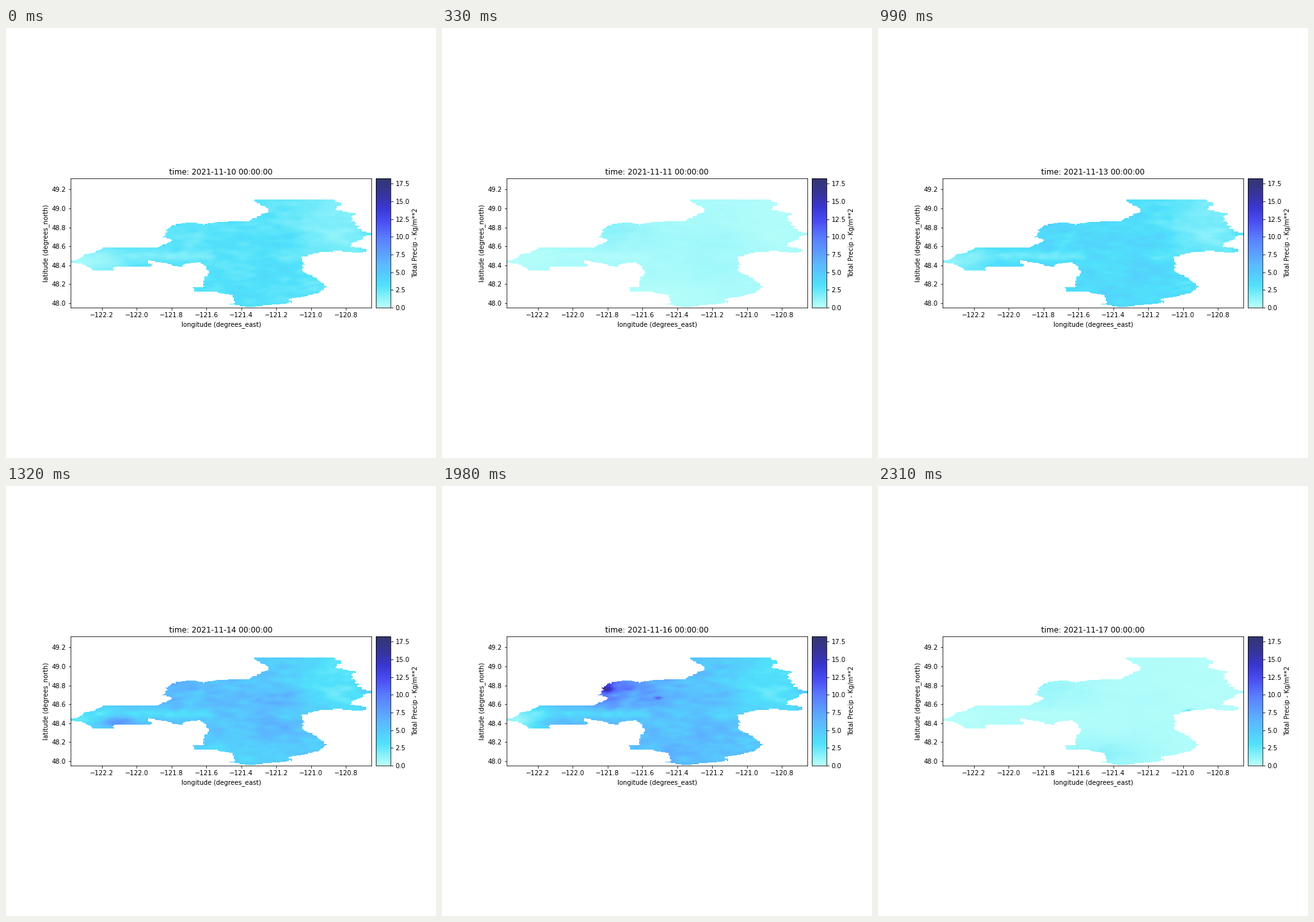
A matplotlib script that plays this animation: 672 by 672 pixels, repeating every 2.64 s.

```python
import numpy as np
import matplotlib.pyplot as plt
from matplotlib.animation import FuncAnimation
from matplotlib.colors import LinearSegmentedColormap
from matplotlib.path import Path

SIZE, DPI = 672, 72
MAP_BOX = (0.15, 0.35, 0.70, 0.30)
BAR_BOX = (0.86, 0.35, 0.035, 0.30)
EXTENT = (-122.380, -120.653, 47.9545, 49.3155)
NX, NY = 207, 164
VMAX = 18.24

# Key points of the basin outline in stage pixels, clockwise from the west
OUTLINE = [
    (98, 363.6), (112, 362.5), (124, 354.5), (137, 352), (152, 344),
    (236, 343.5), (262, 332), (246, 327), (252, 313), (268, 307), (290, 304),
    (309, 308), (333, 303), (376, 302), (391, 296), (411, 286), (388, 271),
    (388, 269), (510, 269), (525, 276), (513, 284), (544, 291), (541, 301),
    (551, 314), (563, 320.6), (578, 320.6), (578, 323.4), (564, 324),
    (553, 332), (537, 337), (541, 343), (564, 345), (558, 352), (520, 349),
    (495, 350), (460, 359), (466, 368), (460, 380), (481, 389), (502, 405),
    (483, 416), (443, 424), (445, 430), (381, 436), (348, 432), (356, 430),
    (353, 418), (328, 413), (294, 412), (291, 406), (307, 405), (314, 381),
    (313, 374), (304, 366), (283, 368), (272, 374), (248, 367), (220, 364),
    (228, 373), (170, 373), (166, 380), (139, 380), (118, 369), (98, 366.8),
]

# Regions that gain or lose rain together: x, y, half width, half height
REGIONS = {
    "west": (112, 367, 50, 30),
    "hills": (170, 368, 26, 9),
    "northwest": (262, 318, 65, 26),
    "centre": (430, 350, 70, 38),
    "south": (345, 420, 80, 24),
    "east": (512, 312, 62, 70),
}
# Daily base rain, then the change in each region
DAYS = {
    10: (2.8, -2.2, -0.8, 0.0, 0.5, 0.4, -1.2),
    11: (0.5, -0.3, 0.0, 0.9, 0.3, -0.3, -0.2),
    12: (5.0, -2.4, 1.5, 1.5, 1.0, 2.3, -3.5),
    13: (3.4, -2.0, 0.0, 0.5, 0.5, 0.2, -1.6),
    14: (5.0, -2.2, 4.0, 1.5, 1.4, -1.2, -2.3),
    15: (6.8, -4.0, 1.0, 4.0, 1.5, 0.0, -3.0),
    16: (5.4, -4.4, 1.2, 5.0, 0.3, 0.6, -2.4),
    17: (0.3, -0.2, 0.0, 0.7, 0.1, 0.9, -0.1),
}
# Small storm cores: day, amount, region
CORES = [
    (16, 6.5, (256, 317, 10, 6)), (16, 5, (337, 331, 7, 2.5)),
    (17, 3.0, (486, 351, 8, 2)),
]
# Dry valleys as segments with a relative loss
VALLEYS = [
    ((145, 355), (320, 357), 0.34), ((278, 351), (304, 322), 0.2),
    ((465, 300), (548, 346), 0.25),
]

rng = np.random.default_rng(11)
left, right = MAP_BOX[0] * SIZE, (MAP_BOX[0] + MAP_BOX[2]) * SIZE
top, bottom = (1 - MAP_BOX[1] - MAP_BOX[3]) * SIZE, (1 - MAP_BOX[1]) * SIZE
X, Y = np.meshgrid(
    left + (np.arange(NX) + 0.5) * (right - left) / NX,
    top + (np.arange(NY) + 0.5) * (bottom - top) / NY,
)


def noise(sx, sy, tilt=0.0):
    """Smooth periodic noise with unit spread."""
    fy, fx = np.meshgrid(np.fft.fftfreq(NY), np.fft.fftfreq(NX), indexing="ij")
    u, v = fx + tilt * fy, fy - tilt * fx
    blur = np.exp(-2 * np.pi**2 * ((u * sx) ** 2 + (v * sy) ** 2))
    n = np.fft.ifft2(np.fft.fft2(rng.standard_normal((NY, NX))) * blur).real
    return n / n.std()


def bump(x, y, w, h):
    return np.exp(-((X - x) / w) ** 2 - ((Y - y) / h) ** 2)


def valley(a, b, loss, width=5):
    (ax0, ay0), (dx, dy) = a, np.subtract(b, a)
    t = np.clip(((X - ax0) * dx + (Y - ay0) * dy) / (dx**2 + dy**2), 0, 1)
    d2 = (X - ax0 - t * dx) ** 2 + (Y - ay0 - t * dy) ** 2
    return loss * np.exp(-d2 / (2 * width**2))


ragged = X + 1.5 * noise(0.6, 0.6)
inside = Path(OUTLINE).contains_points(
    np.column_stack([ragged.ravel(), Y.ravel() + 0.5])).reshape(X.shape)
terrain = 1 + 0.07 * noise(4.5, 2.4, 0.25) + 0.04 * noise(2.2, 1.3, -0.3)
terrain -= sum(valley(*v) for v in VALLEYS)
regions = [bump(*r) for r in REGIONS.values()]


def rainfall(day):
    base, *changes = DAYS[day]
    rain = base + sum(c * r for c, r in zip(changes, regions))
    rain = rain * terrain
    rain += sum(amount * bump(*r) for d, amount, r in CORES if d == day)
    return np.ma.masked_where(~inside, np.clip(rain, 0.1, VMAX))


days = list(DAYS)
fields = [rainfall(day) for day in days]

cmap = LinearSegmentedColormap.from_list("rain", [
    (0, "#bafffa"), (0.17, "#50e1fb"), (0.34, "#5cb7ff"), (0.54, "#5a7dff"),
    (0.67, "#4a4cf2"), (0.78, "#3836d0"), (0.88, "#37349b"), (1, "#333670"),
])

plt.rcParams.update({"font.family": "DejaVu Sans", "font.size": 10})
fig = plt.figure(figsize=(SIZE / DPI, SIZE / DPI), dpi=DPI, facecolor="white")
ax = fig.add_axes(MAP_BOX)
image = ax.imshow(fields[0], cmap=cmap, vmin=0, vmax=VMAX, extent=EXTENT,
                  aspect="auto", interpolation="nearest")
ax.set_xticks(np.arange(-122.2, -120.7, 0.2))
ax.set_yticks(np.arange(48.0, 49.3, 0.2))
ax.set_xlabel("longitude (degrees_east)")
ax.set_ylabel("latitude (degrees_north)")
title = ax.set_title("", fontsize=12)

bar = fig.colorbar(image, cax=fig.add_axes(BAR_BOX))
bar.set_ticks(np.arange(0, 18, 2.5))
bar.set_label("Total Precip - Kg/m**2")


def update(i):
    image.set_data(fields[i])
    title.set_text(f"time: 2021-11-{days[i]} 00:00:00")
    return image, title


anim = FuncAnimation(fig, update, frames=len(days), interval=330,
                     repeat=True, repeat_delay=0, blit=False)
plt.show()
```
